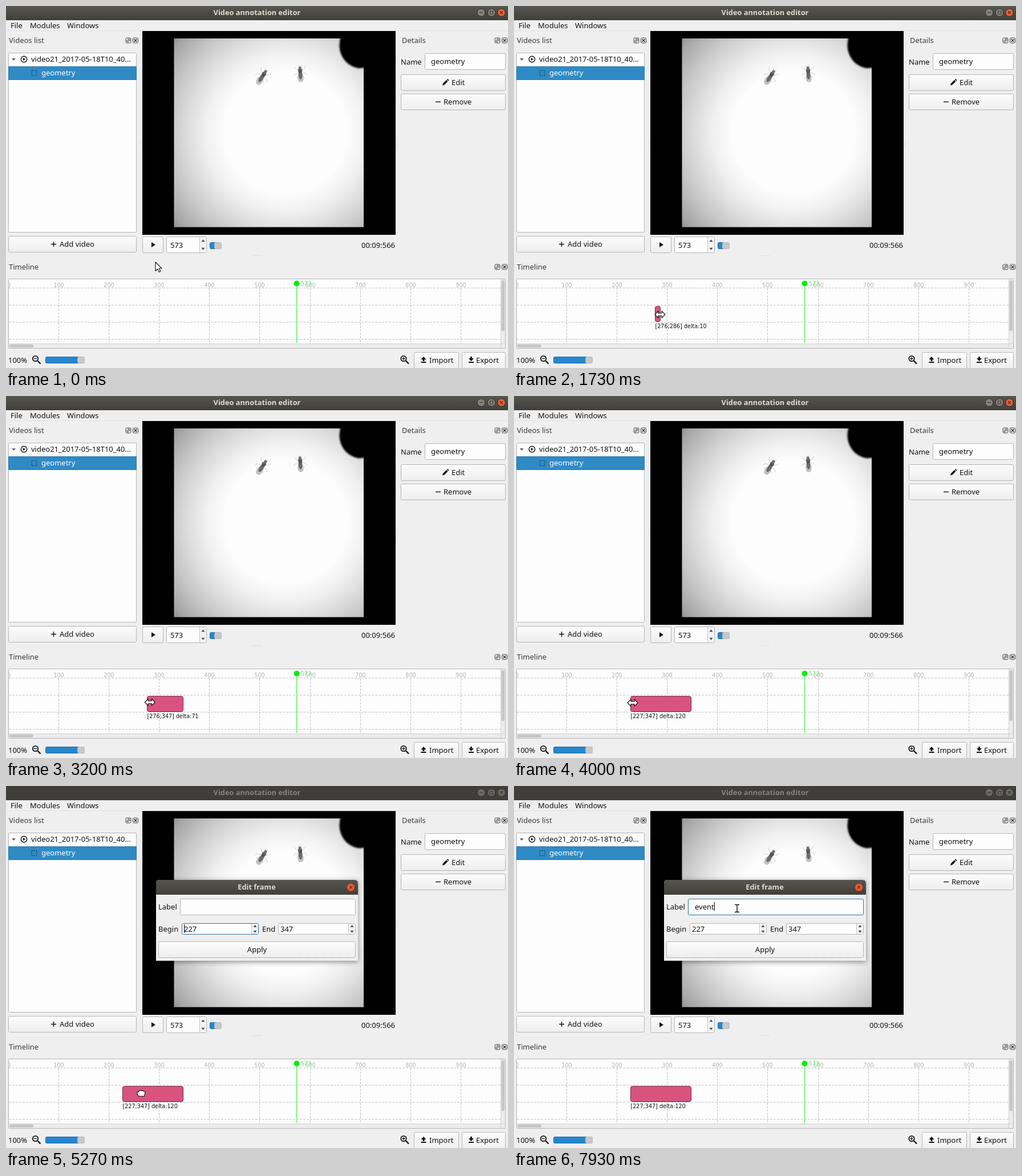
An HTML page that plays this animation: 880 by 636 pixels, repeating every 8 s.

```html
<!DOCTYPE html>
<html lang="en">
<head>
<meta charset="utf-8">
<title>Video annotation editor</title>
<style>
  html, body { margin: 0; width: 100%; height: 100%; overflow: hidden; background: #efeff0; }
  svg { display: block; width: 880px; height: 636px; }
  text { font: 13px "Noto Sans", "Open Sans", sans-serif; fill: #111; white-space: pre; }
  .bold { font-weight: 700; font-size: 12.8px; }
  .dock { fill: #3a3a3c; }
  .tick { font: 9.6px "DejaVu Sans", sans-serif; }
</style>
</head>
<body>
<svg id="stage" viewBox="0 0 880 636" xmlns="http://www.w3.org/2000/svg"></svg>
<script>
const LOOP = 8000;
const EDGE = '#b5b5b7', FOCUS = '#2a74aa';
const stage = document.getElementById('stage');
const frameX = n => 4.2 + n * 0.8815;
const crisp = x => Math.floor(x) + .5;

// Drawing helpers, all returning SVG markup
const rect = (x, y, w, h, fill, attrs = '') =>
  `<rect x="${x}" y="${y}" width="${w}" height="${h}" fill="${fill}" ${attrs}/>`;
const path = (d, attrs = 'fill="#111"') => `<path d="${d}" ${attrs}/>`;
const text = (x, y, s, attrs = '') => `<text x="${x}" y="${y}" ${attrs}>${s}</text>`;
const circle = (x, y, r, attrs) => `<circle cx="${x}" cy="${y}" r="${r}" ${attrs}/>`;
const group = (attrs, ...parts) => `<g ${attrs}>${parts.join('')}</g>`;
const stroke = (color, width = 1) => `fill="none" stroke="${color}" stroke-width="${width}"`;
const box = (x, y, w, h, fill, radius = 2, edge = EDGE, id = '') =>
  rect(x + .5, y + .5, w - 1, h - 1, fill, `rx="${radius}" stroke="${edge}" ${id}`);
const button = (x, y, w, h) => box(x, y, w, h, 'url(#button)');
const slider = (x, y, length, handle) =>
  box(x, y, length, 12, '#2587ce', 2, '#1f70a9') + box(handle, y, 13, 12, '#c8c8c9', 2, '#b9b9bb');

function spinner(x, y, w, h, arm, id = '') {
  const ax = x + w - arm / 2, mid = y + h / 2, d = h / 4;
  return box(x, y, w, h, '#fdfdfd', 2, EDGE, id) +
    rect(x + w - arm, y + 1, arm - 1, h - 2, '#f4f4f5') +
    path(`M${x + w - arm + .5} ${y + 1}v${h - 2}`, stroke('#c4c4c6')) +
    path(`M${ax - 3} ${mid - d + 2}l3 -4 3 4zM${ax - 3} ${mid + d - 2}l3 4 3 -4z`, 'fill="#4a4a4c"');
}

function dockIcons(x, y) {
  const edge = stroke('#4a4a4c');
  return rect(x - 4.5, y - 4.5, 9, 9, 'none', `rx="2" ${edge}`) +
    rect(x - .5, y - 2.5, 3, 3, 'none', edge) + path(`M${x - 2.5} ${y - .5}v3h3`, edge) +
    rect(x + 8, y - 4.5, 9, 9, 'none', `rx="2" ${edge}`) +
    path(`M${x + 10} ${y - 2.5}l5 5m0 -5l-5 5`, stroke('#333', 1.5));
}

function magnifier(x, y, sign) {
  return circle(x - 2, y - 2, 4.7, stroke('#111', 1.8)) +
    path(`M${x + 2} ${y + 2}l5 5`, stroke('#111', 2.4)) +
    path(`M${x - 4.5} ${y - 2}h5` + (sign ? `M${x - 2} ${y - 4.5}v5` : ''), stroke('#111', 1.3));
}

function fly(x, y, angle, scale) {
  return group(`transform="translate(${x} ${y}) rotate(${angle}) scale(${scale})"`,
    path('M-3 -6l-6 -4 -2 -4M3 -6l6 -4 2 -4M-3 -2l-8 2 -2 4M3 -2l8 2 2 4M-2 3l-6 5M2 3l6 5M-1 -12l-2 -5M1 -12l2 -5',
      stroke('#a3a398', .8) + ' opacity=".65"'),
    path('M-2 -4Q-8 9 -4 15Q0 18 4 15Q8 9 2 -4z', 'fill="#99999b" opacity=".6"'),
    '<ellipse cy="2" rx="3.7" ry="9" fill="#56565a" opacity=".8"/>',
    '<ellipse cy="-6" rx="4" ry="5" fill="#505054" opacity=".9"/>',
    circle(0, -11.5, 2.8, 'fill="#707074"'));
}

const gradient = (id, ...colors) =>
  `<linearGradient id="${id}" x2="0" y2="1">${colors.map((c, i) =>
    `<stop offset="${i / (colors.length - 1)}" stop-color="${c}"/>`).join('')}</linearGradient>`;

const defs = `<defs>
  ${gradient('button', '#fcfcfc', '#eeeeef')}
  ${gradient('titlebar', '#56554f', '#403f3a')}
  <radialGradient id="light" gradientUnits="userSpaceOnUse" cx="490" cy="222" r="270">
    <stop offset=".4" stop-color="#fdfdfd"/><stop offset=".52" stop-color="#f0f0f0"/>
    <stop offset=".63" stop-color="#dedede"/><stop offset=".75" stop-color="#c8c8c8"/>
    <stop offset=".9" stop-color="#a6a6a6"/><stop offset="1" stop-color="#808080"/>
  </radialGradient>
  <clipPath id="photo"><rect x="294.5" y="57" width="332.5" height="331.5"/></clipPath>
  <clipPath id="track"><rect x="5" y="480" width="862" height="113"/></clipPath>
  <filter id="blur" x="-20%" y="-20%" width="140%" height="140%"><feGaussianBlur stdDeviation="5"/></filter>
  <filter id="soft"><feGaussianBlur stdDeviation="1.8"/></filter>
</defs>`;

function titlebar() {
  const knob = (x, glyph, fill) => circle(x, 11.5, 6.7, `fill="${fill}" stroke="#34332f"`) +
    path(glyph, stroke('#3a3935', 1.2));
  const knobs = (a, b) =>
    knob(833, 'M830 11.5h6', a) + knob(851, 'M848.5 9h5v5h-5z', a) + knob(868.5, 'M866 9l5 5m0 -5l-5 5', b);
  const title = fill => text(440, 16, 'Video annotation editor', `class="bold" text-anchor="middle" style="fill:${fill}"`);
  return group('id="active"', rect(0, 0, 880, 25, 'url(#titlebar)'), title('#dfdbd2'), knobs('#85837b', '#ee6038')) +
    group('id="inactive"', rect(0, 0, 880, 25, '#3f3e3b'), title('#85837d'), knobs('#6b6a65', '#6b6a65'));
}

function videoList() {
  return text(5, 65, 'Videos list', 'class="dock"') + dockIcons(214.5, 60.5) +
    box(4, 82, 225, 316, '#fdfdfd', 1) + box(4, 106, 225, 24, '#2f8bc5', 0, '#2a77a9') +
    path('M10 92h7l-3.5 4z', 'fill="#666"') +
    circle(31.5, 93.5, 5.2, stroke('#111', 1.4)) + path('M30 91v5l4 -2.5z') +
    text(44, 98, 'video21_2017-05-18T10_40…') +
    rect(45, 113.5, 9, 9, 'none', 'stroke="#14374f" stroke-dasharray="2 1.5"') +
    text(62, 122, 'geometry', 'style="fill:#fff"') +
    button(4, 404, 225, 29) + path('M79 418.5h9m-4.5 -4.5v9', stroke('#111', 1.4)) + text(94, 423, 'Add video');
}

function videoView() {
  return rect(239, 44, 444, 358, '#000') +
    group('clip-path="url(#photo)"', rect(294, 57, 333, 332, 'url(#light)'),
      path('M590 45Q580 68 588 86Q596 104 616 109Q626 110 645 104V45z', 'fill="#050505" filter="url(#soft)"'),
      fly(449, 124.5, 33, .95), fly(516, 119, -4, .9)) +
    button(239, 405, 37, 29) + path('M255 415v9l7 -4.5z') +
    spinner(281, 405, 71, 29, 13) + text(288, 425, '573') +
    slider(357, 415, 14, 365) +
    text(623, 425, '00:09:566') +
    path('M434 438.5h13', stroke('#bbb') + ' stroke-dasharray="1 2"') +
    path('M236.5 236v10M685.5 237v10', stroke('#c4c4c4') + ' stroke-dasharray="1 2"');
}

function details() {
  return text(694, 65, 'Details', 'class="dock"') + dockIcons(861.5, 60.5) +
    text(692, 103, 'Name') + box(734, 83, 142, 29, '#fdfdfd') + text(745, 102, 'geometry') +
    button(692, 120, 184, 29) +
    path('M765 139.5l1 -3.5 6 -6 2.5 2.5 -6 6zM772.8 129.2l1.4 -1.2 2.4 2.4 -1.3 1.3z') +
    text(781, 139, 'Edit') +
    button(692, 154, 184, 29) + path('M753 168.5h9', stroke('#111', 1.4)) + text(767, 173, 'Remove');
}

function timeline() {
  let grid = '', labels = text(5, 494, '0', 'class="tick" text-anchor="middle" style="fill:#b4b4b6"');
  for (let y = 495.5; y < 590; y += 30) grid += `M5 ${y}H867`;
  let columns = '';
  for (let n = 100; n < 1000; n += 100) {
    const x = crisp(frameX(n));
    columns += `M${x} 496V593`;
    labels += text(x, 494, n, 'class="tick" text-anchor="middle" style="fill:#b4b4b6"');
  }
  const arrow = (x, up) => path(up ? `M${x - 4} 621l4.5 -5 4.5 5h-3v3h-3v-3z` : `M${x - 4} 619l4.5 5 4.5 -5h-3v-3h-3v3z`) +
    rect(x - 4, 625, 9, 2, '#111');
  return text(5, 463, 'Timeline', 'class="dock"') + dockIcons(861.5, 458.5) +
    box(4, 479, 872, 123, '#fdfdfd', 1) +
    group('clip-path="url(#track)"',
      path(grid, stroke('#c3c3d3') + ' stroke-dasharray="4 2"'),
      path(columns, stroke('#c2c2c4') + ' stroke-dasharray="4 2"'), labels) +
    rect(867, 480, 8, 121, '#ececed') + rect(5, 593, 870, 8, '#ececed') +
    path('M867.5 480V601M5 593.5H875', stroke('#d2d2d4')) +
    rect(868.5, 482, 5.5, 89, '#c6c6c8', 'rx="2.5"') + rect(6, 594.5, 42, 5.5, '#c6c6c8', 'rx="2.5"') +
    text(4, 627, '100%') + magnifier(53.5, 621.5, false) +
    slider(69, 616, 65, 125) +
    magnifier(699, 621.5, true) +
    button(715, 608, 79, 34) + arrow(731.5, true) + text(742, 627, 'Import') +
    button(799, 608, 77, 34) + arrow(815, false) + text(824, 627, 'Export') +
    group('id="event"', rect(0, 527.5, 9, 27, '#d8547f', 'id="bar" rx="3" stroke="#702640"'),
      text(0, 566, '', 'id="range" class="tick"')) +
    path('M509.5 487V592', stroke('#7cf583', 2)) + circle(509.5, 487.5, 5, 'fill="#08ee10"') +
    text(517, 491, '573', 'class="tick" style="fill:#55ec60"');
}

function dialog() {
  return group('id="dialog"',
    rect(263, 167, 354, 142, '#000', 'opacity=".45" filter="url(#blur)"'),
    path('M263 307V171q0 -6 6 -6H611q6 0 6 6V307z', 'fill="#efeff0"'),
    path('M263 191V171q0 -6 6 -6H611q6 0 6 6V191z', 'fill="url(#titlebar)"'),
    text(439.5, 182, 'Edit frame', 'class="bold" text-anchor="middle" style="fill:#dfdbd2"'),
    circle(604.5, 178, 7, 'fill="#ec5c34" stroke="#6b3524"'),
    path('M602 175.5l5 5m0 -5l-5 5', stroke('#6b2c19', 1.1)),
    text(267, 217, 'Label'), box(305, 198, 308, 29, '#fdfdfd', 2, EDGE, 'id="labelBox"'),
    text(317, 217, '', 'id="label"'),
    text(267, 256, 'Begin'), spinner(308, 241, 135, 20, 13, 'id="beginBox"'), text(312, 256, '227'),
    text(449, 256, 'End'), spinner(477, 241, 136, 20, 13), text(481, 256, '347'),
    button(267, 273, 346, 29), text(440, 292, 'Apply', 'text-anchor="middle"'),
    rect(0, 0, 1.2, 15, '#111', 'id="caret"'));
}

const outline = 'fill="#fff" stroke="#111" stroke-width="1.1" stroke-linejoin="round"';
const cursors = {
  arrow: path('M0 0V15.5L3.7 12 6.3 17.5 8.8 16.3 6.3 11H11z', outline),
  resize: path('M-9 0l6 -6v3.7h6V-6l6 6 -6 6V2.3h-6V6z', outline),
  hand: path('M-5 5L-7 1V-2Q-6 -3 -5 -2Q-5 -5 -2.5 -4.4Q-1 -6 .5 -4.6Q3 -6 4 -3.8Q7 -4 6.7 -1L5.5 5z', outline),
  beam: path('M-4 -6.5h3l1 1 1 -1h3M-4 6.5h3l1 -1 1 1h3M0 -6V6', stroke('#111', 1.4)),
};

stage.innerHTML = defs + rect(0, 0, 880, 636, '#efeff0') + titlebar() +
  text(8, 39, 'File') + text(42, 39, 'Modules') + text(107, 39, 'Windows') +
  path('M0 43.5H880', stroke('#e2e2e3')) +
  videoList() + videoView() + details() + timeline() + dialog() +
  Object.entries(cursors).map(([name, shape]) => group(`id="cursor-${name}"`, shape)).join('');

const el = id => document.getElementById(id);
const show = (id, on) => { el(id).style.display = on ? '' : 'none'; };

// Pointer path: time, x, y
const pointer = [
  [0, 262, 450], [300, 262, 452], [950, 247, 538], [1350, 247, 540], [1600, 256, 542], [1800, 256, 542],
  [2500, 310, 541], [2650, 310, 541], [3130, 254, 538], [3260, 251, 538], [3400, 251, 538],
  [3930, 208, 539], [4250, 208, 539], [4750, 237, 540], [5550, 237, 540], [6250, 390, 229],
  [6500, 390, 229], [6800, 391, 215], [LOOP, 391, 215]];
const pointerKinds = [[0, 'arrow'], [1400, 'resize'], [2730, 'hand'], [3080, 'resize'],
  [4330, 'hand'], [5590, 'arrow'], [6600, 'beam']];
const rangeStart = [[0, 276], [3400, 276], [3930, 227], [LOOP, 227]];
const rangeEnd = [[0, 286], [1800, 286], [2500, 347], [LOOP, 347]];
const typing = [7200, 7330, 7470, 7600, 7730];
const CREATED = 1270, OPENED = 5130, FOCUSED = 6870;

function sample(keys, t, column = 1) {
  const i = Math.max(1, keys.findIndex(k => k[0] > t));
  const a = keys[i - 1], b = keys[i];
  const u = (t - a[0]) / (b[0] - a[0]);
  return a[column] + (b[column] - a[column]) * u * u * (3 - 2 * u);
}

function render(time) {
  const t = Math.floor(time * .015 + .1) / .015 % LOOP;

  const kind = pointerKinds.filter(k => k[0] <= t).pop()[1];
  for (const name in cursors) show('cursor-' + name, name === kind);
  el('cursor-' + kind).setAttribute('transform', `translate(${sample(pointer, t, 1)} ${sample(pointer, t, 2)})`);

  const from = Math.round(sample(rangeStart, t)), to = Math.round(sample(rangeEnd, t));
  const x = crisp(frameX(from));
  show('event', t >= CREATED);
  el('bar').setAttribute('x', x);
  el('bar').setAttribute('width', crisp(frameX(to)) - x);
  el('range').setAttribute('x', x);
  el('range').textContent = `[${from};${to}] delta:${to - from}`;

  const open = t >= OPENED, inLabel = t >= FOCUSED;
  show('dialog', open);
  show('active', !open);
  show('inactive', open);
  if (!open) return;
  el('labelBox').setAttribute('stroke', inLabel ? FOCUS : EDGE);
  el('beginBox').setAttribute('stroke', inLabel ? EDGE : FOCUS);
  const typed = typing.filter(k => k <= t).length;
  el('label').textContent = 'event'.slice(0, typed);
  const lastInput = typed ? typing[typed - 1] : inLabel ? FOCUSED : OPENED;
  show('caret', (t - lastInput) % 1000 < 500);
  el('caret').setAttribute('x', inLabel ? 317 + (typed && el('label').getComputedTextLength()) : 312);
  el('caret').setAttribute('y', inLabel ? 204 : 243);
}

const start = performance.now();
function tick() {
  render((performance.now() - start) % LOOP);
  requestAnimationFrame(tick);
}
tick();
</script>
</body>
</html>
```
